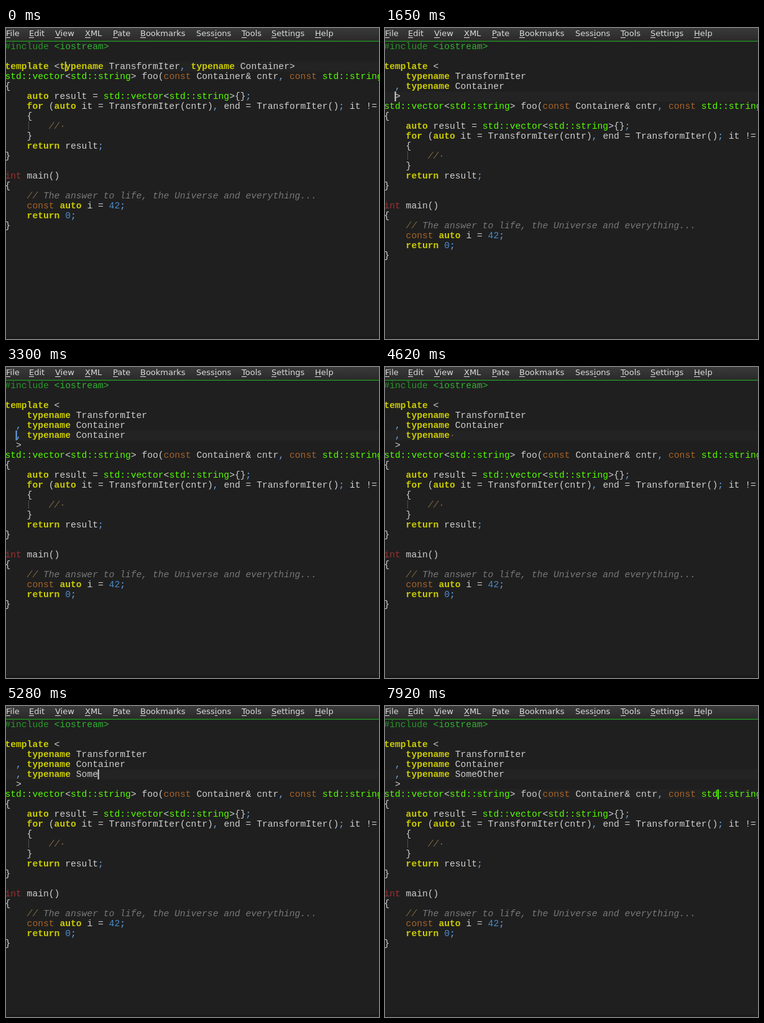
Animation, 600 px wide and 500 px high, one loop 8 s. Source, as an HTML page with a canvas:

```html
<!DOCTYPE html>
<html lang="en">
<head>
<meta charset="utf-8">
<title>Code editor</title>
<style>
  html, body { margin: 0; width: 100%; height: 100%; overflow: hidden; background: #1f1f1f; }
  canvas { display: block; }
</style>
</head>
<body>
<canvas id="stage" width="600" height="500"></canvas>
<script>
const ctx = document.getElementById('stage').getContext('2d');
const LOOP = 8000, CELL = 8.8, LEFT = -1.6, TOP = 22, ROW = 16;
const MONO = '14.667px "Liberation Mono", monospace';
const ITALIC = 'italic ' + MONO;

// Token style: colour, font prefix
const STYLES = {
  text: ['#d0d0d0', ''],
  key: ['#cccc00', 'bold '],
  std: ['#55ff00', ''],
  mod: ['#a86428', ''],
  type: ['#a03030', ''],
  num: ['#4a8ccc', ''],
  punct: ['#6ca6e8', ''],
  pre: ['#2a962a', ''],
  head: ['#30b430', ''],
  mark: ['#806840', ''],
  note: ['#787878', '']
};

const RULES = [
  ['note', /^\/\/ .+/], ['mark', /^\/\/|^·/],
  ['pre', /^#include/], ['head', /^<iostream>/],
  ['key', /^(template|typename|auto|for|return)\b/],
  ['std', /^std::(vector|string)/],
  ['mod', /^const\b/], ['type', /^int\b/],
  ['num', /^\d+/], ['punct', /^[,;]/],
  ['text', /^\w+|^ +|^./]
];

const BODY = [
  'std::vector<std::string> foo(const Container& cntr, const std::string& sep)',
  '{',
  '    auto result = std::vector<std::string>{};',
  '    for (auto it = TransformIter(cntr), end = TransformIter(); it != end; ++it)',
  '    {', '        //·', '    }', '    return result;', '}', '',
  'int main()', '{',
  '    // The answer to life, the Universe and everything...',
  '    const auto i = 42;', '    return 0;', '}'
];
const HEAD = ['#include <iostream>', ''];
const ONE_LINE = ['template <typename TransformIter, typename Container>'];
const SPLIT = ['template <', '    typename TransformIter', '  , typename Container'];

// Caret steps: time, row, column, visible
const CARET = [
  [0, 2, 11, 1], [330, 2, 11, 0], [660, 2, 53, 1], [990, 2, 53, 0],
  [1320, 2, 52, 1], [1650, 5, 2, 1], [2310, 5, 2, 0], [2640, 5, 2, 1],
  [2970, 4, 2, 1], [3300, 5, 2, 1], [3630, 5, 22, 1], [4290, 5, 13, 1],
  [4620, 5, 13, 0], [4950, 5, 15, 1], [5280, 5, 17, 1], [5610, 5, 18, 1],
  [5940, 5, 20, 1], [6270, 5, 22, 1], [6600, 6, 3, 1], [6930, 7, 22, 1],
  [7260, 7, 28, 1], [7590, 7, 44, 1], [7920, 7, 61, 1]
];

// Menu: x, label, index of the underlined letter
const MENU = [
  [0, 'File', 0], [37, 'Edit', 0], [79, 'View', 0], [127, 'XML', 0],
  [172, 'Pate', 0], [216, 'Bookmarks', 0], [306, 'Sessions', 4],
  [379, 'Tools', 0], [427, 'Settings', 0], [497, 'Help', 0]
];

const colX = col => LEFT + col * CELL;
const rowY = row => TOP + row * ROW;

function rect(x, y, w, h, color) {
  ctx.fillStyle = color;
  ctx.fillRect(x, y, w, h);
}

function tokenize(line) {
  const tokens = [];
  let col = 0;
  while (col < line.length) {
    const rest = line.slice(col);
    const [kind, rule] = RULES.find(([, re]) => re.test(rest));
    const text = rest.match(rule)[0];
    tokens.push({ kind, text, col });
    col += text.length;
  }
  return tokens;
}

function drawToken({ kind, text, col }, row) {
  const [color, weight] = STYLES[kind];
  const y = rowY(row) + 12;
  ctx.font = kind === 'note' || kind === 'mark' ? ITALIC : weight + MONO;
  ctx.fillStyle = color;
  if (kind === 'note') {
    ctx.fillText(text.slice(2), colX(col + 2), y);
    ctx.fillStyle = STYLES.mark[0];
    text = '//';
  }
  ctx.fillText(text, colX(col), y);
}

function drawMenu() {
  const shade = ctx.createLinearGradient(0, 0, 0, 21);
  shade.addColorStop(0, '#3a3a3a');
  shade.addColorStop(1, '#2a2a2a');
  rect(0, 0, 600, 21, shade);
  rect(0, 20, 600, 1, '#1c501c');
  rect(0, 21, 600, 1, '#2c962c');
  ctx.font = '13px "DejaVu Sans", sans-serif';
  for (const [x, label, mark] of MENU) {
    ctx.fillStyle = '#dcdcdc';
    ctx.fillText(label, x, 13);
    const start = x + ctx.measureText(label.slice(0, mark)).width;
    rect(Math.round(start), 15, Math.round(ctx.measureText(label[mark]).width), 1, '#dcdcdc');
  }
}

function linesAt(t, caret) {
  if (t < 1650) return [...HEAD, ...ONE_LINE, ...BODY];
  const lines = [...HEAD, ...SPLIT];
  if (t >= 3300) {
    const name = t < 4290 ? 'Container'
      : 'SomeOther'.slice(0, caret[1] === 5 ? caret[2] - 13 : 9);
    lines.push('  , typename' + (name ? ' ' + name : '·'));
  }
  return [...lines, '  >', ...BODY];
}

function draw(t) {
  const caret = CARET.findLast(step => step[0] <= t);
  const [, row, col, visible] = caret;
  const lines = linesAt(t, caret);

  rect(0, 0, 600, 500, '#1f1f1f');
  rect(0, 496, 600, 4, '#1a1a1a');
  rect(0, rowY(row), 600, ROW, '#232323');
  // The edited line keeps its tint after the caret leaves it
  if (t >= 6600) rect(0, rowY(5), 600, ROW, '#232323');
  if (t >= 7260 && t < 7590) rect(colX(28), rowY(7), CELL, ROW, '#343434');

  lines.forEach((line, i) => tokenize(line).forEach(token => drawToken(token, i)));
  rect(36, rowY(lines.indexOf('        //·')), 1, ROW - 2, '#505050');

  // Completion popup
  if (t >= 4950 && t < 5280) {
    rect(45, 118, 555, 64, '#454545');
    rect(46, 119, 554, 62, '#262626');
  }
  if (visible) {
    const under = tokenize(lines[row]).find(k => col >= k.col && col < k.col + k.text.length);
    rect(colX(col) - 0.4, rowY(row), 2, ROW, STYLES[under ? under.kind : 'text'][0]);
  }
  drawMenu();
}

function tick(now) {
  draw(now % LOOP);
  requestAnimationFrame(tick);
}
draw(0);
requestAnimationFrame(tick);
</script>
</body>
</html>
```
